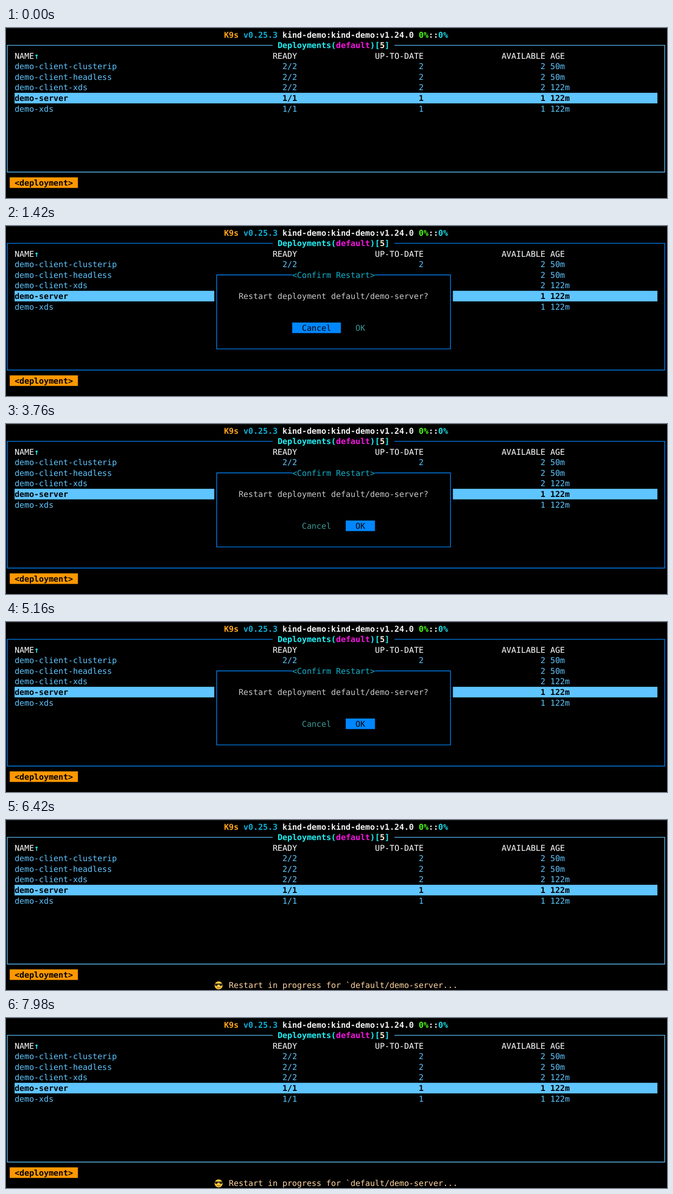
Recreate the animation shown at these times as an HTML page. Size 1280 px wide and 331 px high, loop 8 s.

```html
<!DOCTYPE html>
<html>
<head>
<meta charset="utf-8">
<style>
  html, body { margin: 0; width: 100%; height: 100%; overflow: hidden; background: #000; }
  svg { display: block; }
  text {
    font: 15.66px "DejaVu Sans Mono", "Liberation Mono", monospace;
    white-space: pre;
    text-rendering: geometricPrecision;
  }
  .bold { font-weight: bold; }
</style>
</head>
<body>
<svg id="stage" width="1280" height="331" viewBox="0 0 1280 331"></svg>
<script>
const LOOP = 8000, OPEN = 1120, FOCUS_OK = 3260, CLOSE = 5440;
const SKY = '#5fc5ff', BLUE = '#0087ff', CYAN = '#1ff0f5', ORANGE = '#ff9800', TEAL = '#3c9894';

const stage = document.getElementById('stage');

// Terminal grid: left edge of a column, centre line of a row
const colX = c => -2.2 + 9.43 * c;
const rowY = r => 13 + 20.58 * r;

function add(parent, tag, attrs, content = '') {
  const el = document.createElementNS('http://www.w3.org/2000/svg', tag);
  for (const key in attrs) el.setAttribute(key, attrs[key]);
  el.textContent = content;
  return parent.appendChild(el);
}
const group = (parent = stage) => add(parent, 'g', {});

function write(parent, col, row, content, fill, bold) {
  add(parent, 'text', { x: colX(col), y: rowY(row) + 5.5, fill, class: bold ? 'bold' : '' }, content);
}

function fillCells(parent, from, to, row, fill, rows = 1) {
  add(parent, 'rect', {
    x: colX(from), y: rowY(row) - 10.3, width: colX(to) - colX(from), height: 20.58 * rows, fill
  });
}

// Box drawn through cell centres, with a gap in the top edge for a title
function frame(parent, left, top, right, bottom, gapFrom, gapTo, stroke) {
  const x1 = colX(left + .5), x2 = colX(right + .5);
  const d = `M${colX(gapFrom)} ${rowY(top)}H${x1}V${rowY(bottom)}H${x2}V${rowY(top)}H${colX(gapTo)}`;
  return add(parent, 'path', { d, fill: 'none', stroke, 'stroke-width': 1.4 });
}

add(stage, 'rect', { width: 1280, height: 331 });
add(stage, 'rect', { width: 1280, height: 1, fill: '#1c1c1c' });

// Header and panel title
[
  [45, 0, 'K9s', '#ffa51c'],
  [49, 0, 'v0.25.3', '#0fb0d8'],
  [57, 0, 'kind-demo:kind-demo:v1.24.0', '#f2f2f2'],
  [85, 0, '0%', '#4dff1a'],
  [87, 0, '::', '#f2f2f2'],
  [89, 0, '0%', '#18e0e8'],
  [56, 1, 'Deployments(', CYAN],
  [68, 1, 'default', '#f514e0'],
  [75, 1, ')[', CYAN],
  [77, 1, '5', '#fff0dc'],
  [78, 1, ']', CYAN]
].forEach(run => write(stage, ...run, true));
const panel = frame(stage, 0, 1, 135, 13, 55, 80, SKY);

// Table
function tableRow(row, cells, fill, bold) {
  const ends = [0, 60, 86, 111];
  cells.forEach((cell, i) => {
    const col = i === 0 ? 2 : i === 4 ? 112 : ends[i] - cell.length;
    write(stage, col, row, cell, fill, bold);
  });
}
tableRow(2, ['NAME', 'READY', 'UP-TO-DATE', 'AVAILABLE', 'AGE'], '#fff');
write(stage, 6, 2, '↑', CYAN, true);
fillCells(stage, 2, 134, 6, SKY);
[
  ['demo-client-clusterip', 2, '50m'],
  ['demo-client-headless', 2, '50m'],
  ['demo-client-xds', 2, '122m'],
  ['demo-server', 1, '122m'],
  ['demo-xds', 1, '122m']
].forEach(([name, n, age], i) => {
  const selected = i === 3;
  tableRow(i + 3, [name, `${n}/${n}`, `${n}`, `${n}`, age], selected ? '#000' : SKY, selected);
});

fillCells(stage, 1, 15, 14, ORANGE);
write(stage, 2, 14, '<deployment>', '#000', true);

// Confirmation dialog
const dialog = group();
fillCells(dialog, 43, 92, 4, '#000', 8);
frame(dialog, 43, 4, 91, 11, 59, 76, BLUE);
write(dialog, 59, 4, '<Confirm Restart>', '#12b0cc');
write(dialog, 48, 6, 'Restart deployment default/demo-server?', '#c8c8c8');

function button(from, to, label) {
  const focused = group(dialog), plain = group(dialog);
  fillCells(focused, from, to, 9, BLUE);
  write(focused, from + 2, 9, label, '#000');
  write(plain, from + 2, 9, label, TEAL);
  return on => { show(focused, on); show(plain, !on); };
}
const focusCancel = button(59, 69, 'Cancel');
const focusOk = button(70, 76, 'OK');

// Status message with a sunglasses face
const status = group();
const face = add(status, 'g', { transform: 'translate(411.7 322)' });
add(face, 'circle', { r: 7.8, fill: '#ffc93c' });
add(face, 'path', { d: 'M-7.6-3.4H7.6L6.8 0Q4 3 1.2-1.6H-1.2Q-4 3-6.8 0Z', fill: '#26221e' });
add(face, 'path', { d: 'M-3.6 3.4Q0 6.4 3.6 3.4', fill: 'none', stroke: '#7a4a10', 'stroke-width': 1.2 });
write(status, 46, 15, 'Restart in progress for `default/demo-server...', '#ffd5a0');

function show(el, on) { el.style.display = on ? '' : 'none'; }

function render(now) {
  const t = now % LOOP;
  const open = t >= OPEN && t < CLOSE;
  show(dialog, open);
  show(status, t >= CLOSE);
  panel.setAttribute('stroke', open ? BLUE : SKY);
  if (open) {
    focusCancel(t < FOCUS_OK);
    focusOk(t >= FOCUS_OK);
  }
}

const start = performance.now();
function tick() {
  render(performance.now() - start);
  requestAnimationFrame(tick);
}
tick();
</script>
</body>
</html>
```
